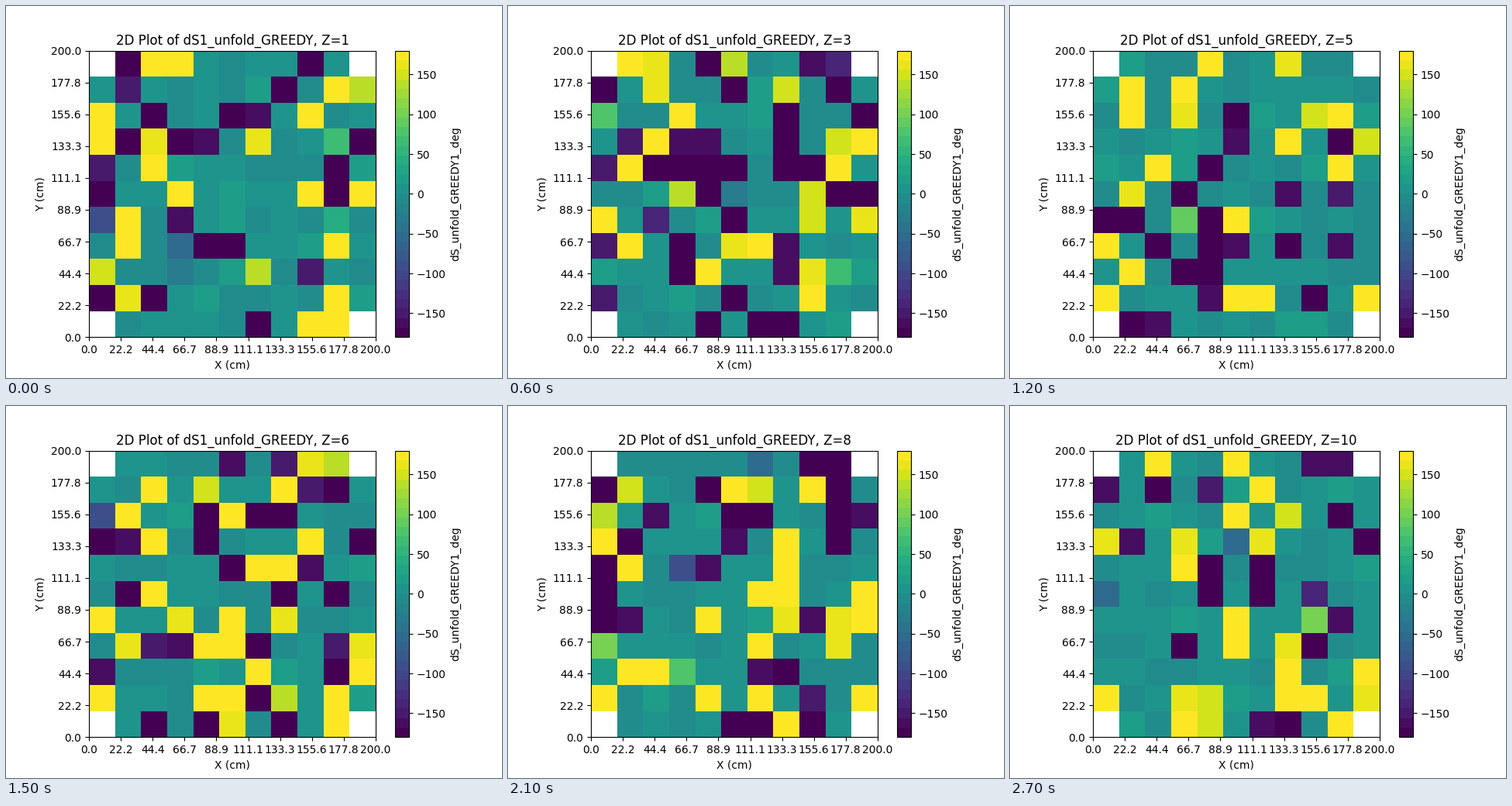
These frames come from a looping animation (640 by 480 pixels, 3000 ms). A matplotlib script:

```python
import numpy as np
import matplotlib.pyplot as plt
from matplotlib.animation import FuncAnimation

CELLS = 11
LAYERS = 10
EXTENT_CM = 200


def phase_grid(z):
    """Phases cluster at zero and at both ends of the wrapped range."""
    rng = np.random.default_rng(z)
    shape = (CELLS, CELLS)
    tail = np.minimum(rng.exponential(10, shape), 45)
    kind = rng.choice(4, size=shape, p=[0.53, 0.22, 0.21, 0.04])
    grid = np.choose(kind, [
        rng.uniform(-12, 16, shape),
        tail - 180,
        180 - tail,
        rng.uniform(-130, 130, shape),
    ])
    grid[np.ix_([0, -1], [0, -1])] = np.nan
    return np.ma.masked_invalid(grid)


grids = [phase_grid(z) for z in range(1, LAYERS + 1)]
edges = np.linspace(0, EXTENT_CM, CELLS + 1)

fig, ax = plt.subplots(figsize=(6.4, 4.8), dpi=100)
mesh = ax.pcolormesh(edges, edges, grids[0], vmin=-180, vmax=180,
                     cmap=plt.get_cmap("viridis", 30))
ax.set_aspect("equal")
fig.colorbar(mesh, ax=ax, label="dS_unfold_GREEDY1_deg",
             ticks=range(-150, 151, 50))

ticks = np.linspace(0, EXTENT_CM, 10)
labels = [f"{tick:.1f}" for tick in ticks]
ax.set_xticks(ticks, labels)
ax.set_yticks(ticks, labels)
ax.set_xlabel("X (cm)")
ax.set_ylabel("Y (cm)")
title = ax.set_title("")


def update(frame):
    mesh.set_array(grids[frame])
    title.set_text(f"2D Plot of dS1_unfold_GREEDY, Z={frame + 1}")
    return mesh, title


anim = FuncAnimation(fig, update, frames=LAYERS, interval=300,
                     repeat=True, repeat_delay=0, blit=False)
plt.show()
```
